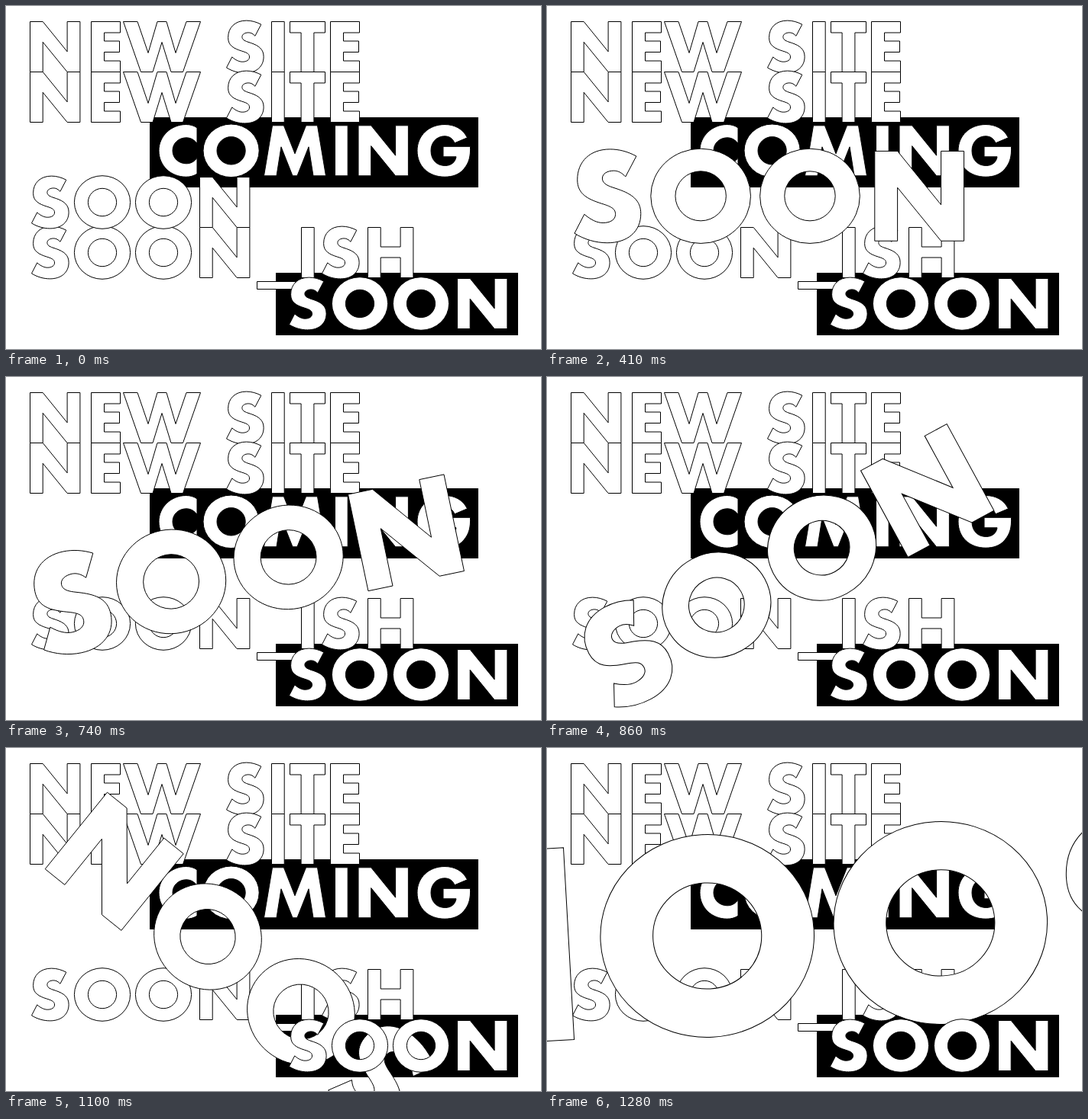
An HTML page that plays this animation: 700 px wide and 450 px high, repeating every 1.31 s.

```html
<!DOCTYPE html>
<html lang="en">
<head>
<meta charset="utf-8">
<title>New site coming soon-ish</title>
<style>
  html, body { margin: 0; width: 100%; height: 100%; overflow: hidden; background: #fff; }
  svg { display: block; width: 700px; height: 450px; }
  path {
    fill: #fff; fill-rule: evenodd;
    stroke: #000; stroke-width: 1; vector-effect: non-scaling-stroke;
  }
</style>
</head>
<body>
<svg id="stage" viewBox="0 0 700 450" role="img" aria-label="NEW SITE NEW SITE COMING SOON SOON_ISH SOON">
  <rect x="188" y="146" width="430" height="92"/>
  <rect x="353" y="350" width="317" height="82"/>
</svg>
<script>
// Geometric capitals: left edge at x = 0, baseline at y = 0, cap height 66.
const GLYPHS = {
  N: 'M0-66H16.7L48.6-26.6V-66H65.4V0H48.6L16.7-39.2V0H0Z',
  E: 'M0-66H38V-51.5H17V-40.5H37V-26H17V-14.5H38V0H0Z',
  W: 'M0-66H18.5L32.5-25L44.5-66H56.5L68.5-25L82.5-66H101L78 0H62.5L50.5-39L38.5 0H23Z',
  I: 'M0-66H16.7V0H0Z',
  T: 'M0-66H46V-51.5H31.4V0H14.6V-51.5H0Z',
  H: 'M0-66H16.7V-40.5H42.6V-66H59.4V0H42.6V-26.5H16.7V0H0Z',
  M: 'M0 0L11-66H26L40.5-29L55-66H70L81 0H64.5L58.5-38L43.5 0H37.5L22.5-38L16.5 0Z',
  O: 'M0-33a36.6 34.8 0 1 0 73.2 0a36.6 34.8 0 1 0-73.2 0ZM18-33a18.6 18.2 0 1 0 37.2 0a18.6 18.2 0 1 0-37.2 0Z',
  S: 'M45.3-62.3L37.4-47.2C34.8-50 32-51.6 28.8-51.6C24-51.6 20.4-49.4 20.4-46C20.4-42.6 23.5-40.9 27.5-39.5L32-38' +
     'C42-34.5 48.6-30 48.6-20C48.6-7 39 1.4 24 1.4C15.5 1.4 7-1.2 0-5.6L7.2-19.6C12-15.5 16.5-13.3 20.8-13.3' +
     'C26.5-13.3 30-15.8 30-19.5C30-23.2 28-25 20-27.4C9.5-30.8 2.1-34.5 2.1-45C2.1-58.5 11.5-67.4 26-67.4C32.5-67.4 39-65.7 45.3-62.3Z',
  C: 'M50-63C45.5-66 41-67.3 35.5-67.3C16-67.3 0-52 0-33C0-13.5 15.5 1.4 35.5 1.4C41 1.4 45 .3 50-2.5V-23.5' +
     'C46.5-18.7 42-16 36-16C26-16 18-23 18-33C18-43 26-50 36-50C42-50 46.5-47 50-42.5Z',
  G: 'M34-38.5H69.5C70-26 68-17 61-9C55-1.5 46 1.4 36 1.4C15 1.4 0-12.5 0-33C0-53 15.5-67.3 36-67.3' +
     'C49-67.3 60-61.5 65.5-50L49-43C46.5-49 42-52 36-52C25.5-52 18-44 18-33C18-21 25.5-13.3 36.5-13.3C44-13.3 50-17.5 51-25H34Z',
  _: 'M0 5H50V15H0Z'
};

const NS = 'http://www.w3.org/2000/svg';
const stage = document.getElementById('stage');

function add(parent, tag, attrs) {
  const el = document.createElementNS(NS, tag);
  for (const name in attrs) el.setAttribute(name, attrs[name]);
  return parent.appendChild(el);
}

function word(letters, xs, x, y) {
  const g = add(stage, 'g', { transform: `translate(${x} ${y})` });
  [...letters].forEach((c, i) =>
    add(g, 'path', { d: GLYPHS[c], transform: `translate(${xs[i]} 0)` }));
  return g;
}

const NEW_SITE = [0, 80, 122, 257, 316, 340, 393];
const SOON = [0, 55.9, 135.9, 220];

word('NEWSITE', NEW_SITE, 31.5, 86.5);
word('NEWSITE', NEW_SITE, 31.5, 152.5);
word('COMING', [0, 58, 137.5, 230.5, 261, 338], 200, 222.8);
word('SOON_ISH', [...SOON, 295, 353, 380, 440], 33.5, 356.5);
const mover = word('SOON', SOON, 33.5, 290.5);
word('SOON', SOON, 370.5, 423.5);

// step, centre x, centre y, turn in degrees, scale
const KEYS = [
  [0, 177, 257.5, 0, 1],
  [11, 317.8, 247.5, 0, 1.96],
  [22, 313.1, 248.1, -14.4, 1.96],
  [28, 302.8, 257.7, -56.8, 1.96],
  [34, 310.9, 296, -183.2, 1.96],
  [38, 320.3, 240.3, -183.2, 3.82]
];
const LOOP = 1310, HOLD = 140, STEP = 30;

function pose(step) {
  const i = Math.max(1, KEYS.findIndex(k => k[0] >= step));
  const a = KEYS[i - 1], b = KEYS[i];
  const f = (step - a[0]) / (b[0] - a[0]);
  return a.map((v, n) => v + (b[n] - v) * f);
}

const start = performance.now();
function draw() {
  const t = (performance.now() - start) % LOOP;
  const step = Math.min(38, Math.max(0, Math.floor((t - HOLD) / STEP)));
  const [, x, y, turn, scale] = pose(step);
  mover.setAttribute('transform',
    `translate(${x} ${y}) rotate(${turn}) scale(${scale}) translate(-143.5 33)`);
  requestAnimationFrame(draw);
}
draw();
</script>
</body>
</html>
```
